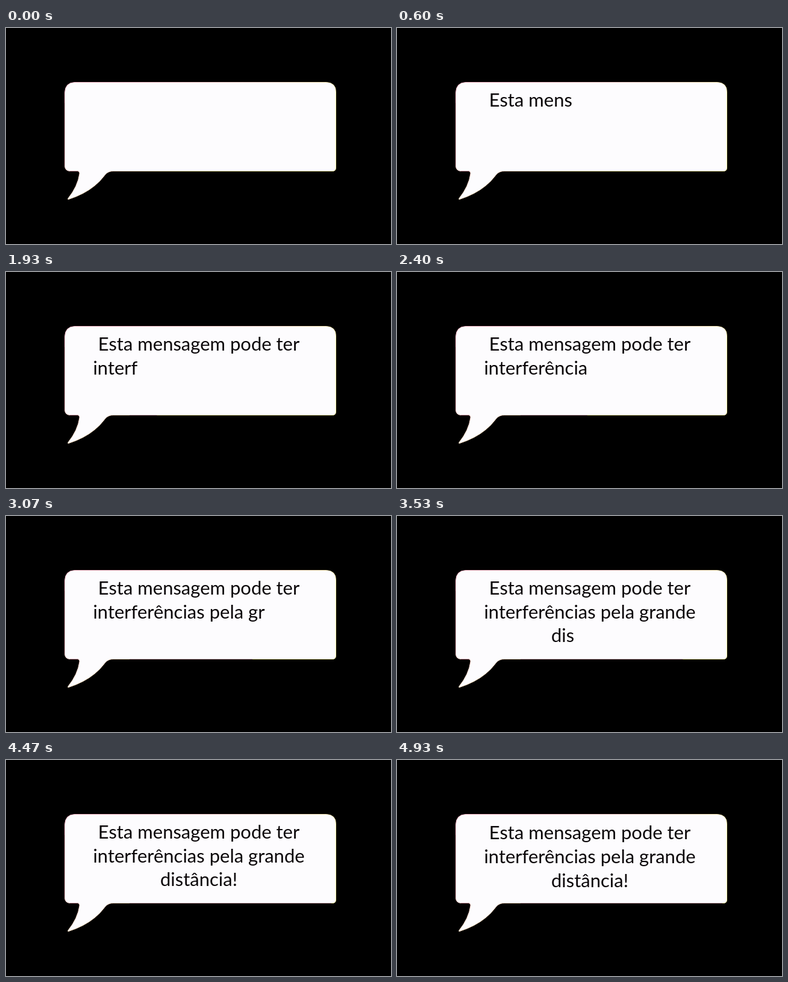
These frames come from a looping animation (639x360 px, 5 s). An HTML page with a canvas:

```html
<!DOCTYPE html>
<html lang="pt">
<head>
<meta charset="utf-8">
<title>Mensagem</title>
<style>
  html, body { margin: 0; width: 100%; height: 100%; overflow: hidden; background: #000; }
  canvas { display: block; }
</style>
</head>
<body>
<canvas id="stage" width="639" height="360"></canvas>
<script>
const ctx = document.getElementById('stage').getContext('2d');
const LOOP = 5000, FPS = 15;
const LINES = ['Esta mensagem pode ter', 'interferências pela grande', 'distância!'];
const FONT = '31px Lato, "Open Sans", sans-serif';
const CENTER = 320, BASELINE = 131, LEADING = 39.6;

const bubble = new Path2D(
  'M114 90.5 H531 Q548 91 547.5 107 V233 Q547.5 238.5 542 238.5 H178 ' +
  'Q170 238.5 165 244 Q156 256 147 263 Q130 277 104 285.5 Q102 286 103 284 ' +
  'Q119 264 122 243 Q122.5 238.5 118 238.5 H106 Q97.5 238 97.5 229 V108 Q98 91 114 90.5 Z');

const rim = ctx.createLinearGradient(240, 60, 350, 270);
rim.addColorStop(0, '#eeb0c0');
rim.addColorStop(0.5, '#f2d3c8');
rim.addColorStop(0.8, '#f4eea0');

function segment(x1, y1, x2, y2, color) {
  ctx.strokeStyle = color;
  ctx.beginPath();
  ctx.moveTo(x1, y1);
  ctx.lineTo(x2, y2);
  ctx.stroke();
}

function drawBubble(time) {
  ctx.fillStyle = '#fdfcfe';
  ctx.fill(bubble);
  ctx.lineWidth = 1;
  ctx.strokeStyle = rim;
  ctx.stroke(bubble);
  segment(97.5, 125, 97.5, 230, '#d9a3ac');
  segment(106, 238.5, 120, 238.5, '#c98f98');
  // Mauve shade creeping along the lower edge
  const reach = Math.min(540, 250 + 0.14 * (time - 1930));
  if (reach > 205) segment(205, 238.5, reach, 238.5, '#d2a9ae');
}

function drawText(count, drop) {
  ctx.font = FONT;
  ctx.fillStyle = '#0a0608';
  LINES.forEach((line, i) => {
    const x = CENTER - ctx.measureText(line).width / 2;
    ctx.fillText(line.slice(0, Math.max(0, count)), x, BASELINE + i * LEADING + drop);
    count -= line.length;
  });
}

function render(now) {
  const frame = Math.floor((now % LOOP + 5) * FPS / 1000);
  const time = frame * 1000 / FPS;
  ctx.fillStyle = '#000';
  ctx.fillRect(0, 0, 639, 360);
  drawBubble(time);
  drawText(Math.floor(0.94 + 0.955 * frame), time > 4600 ? 1.3 : 0);
}

let start;
function tick(now) {
  start ??= now;
  render(now - start);
  requestAnimationFrame(tick);
}
render(0);
requestAnimationFrame(tick);
</script>
</body>
</html>
```
